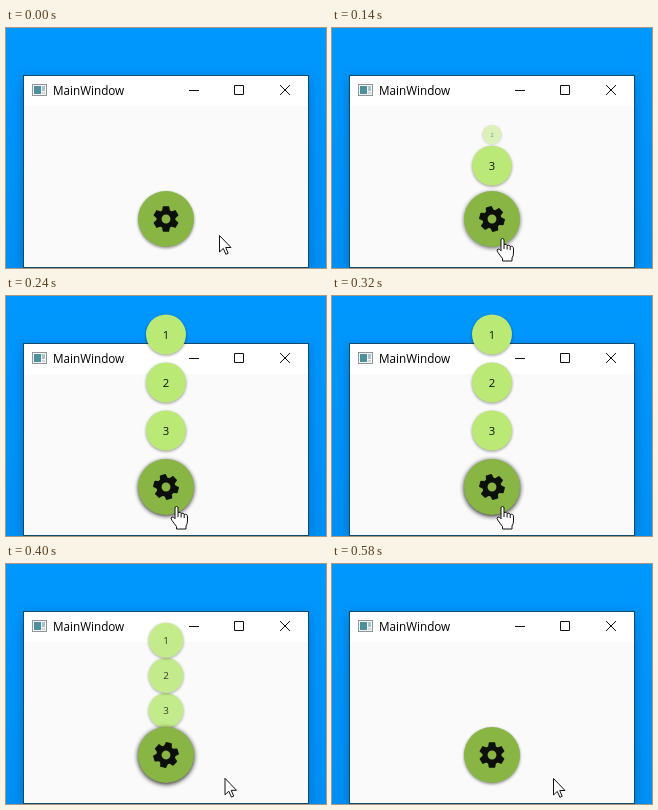
These frames come from a looping animation (320x240 px, 0.68 s). An HTML page:

```html
<!DOCTYPE html>
<html>
<head>
<meta charset="utf-8">
<title>Floating menu</title>
<style>
html, body { margin: 0; width: 100%; height: 100%; overflow: hidden; }
svg { display: block; width: 320px; height: 240px; }
text { font-family: "Open Sans", "Noto Sans", sans-serif; }
</style>
</head>
<body>
<svg viewBox="0 0 320 240">
  <defs>
    <linearGradient id="sky" x1="0" y1="0" x2="0" y2="1">
      <stop offset="0" stop-color="#0098fe"/>
      <stop offset="1" stop-color="#0090f5"/>
    </linearGradient>
    <filter id="wide" x="-20%" y="-20%" width="140%" height="140%"><feGaussianBlur stdDeviation="6"/></filter>
    <filter id="soft" x="-30%" y="-30%" width="160%" height="160%"><feGaussianBlur id="blur" stdDeviation="1.8"/></filter>
    <filter id="small" x="-30%" y="-30%" width="160%" height="160%"><feGaussianBlur stdDeviation="1.8"/></filter>
  </defs>

  <rect width="320" height="240" fill="url(#sky)"/>
  <rect x="17" y="50" width="286" height="192" fill="#003a70" opacity=".4" filter="url(#wide)"/>
  <rect x="17" y="47" width="286" height="193" fill="#10486f"/>
  <rect x="18" y="48" width="284" height="30" fill="#fff"/>
  <rect x="18" y="78" width="284" height="161" fill="#fafafa"/>

  <g>
    <rect x="26.5" y="56.5" width="14" height="11" fill="#f4f4f4" stroke="#8f9699"/>
    <rect x="28" y="58" width="7" height="8" fill="#4d8f9c"/>
    <rect x="36" y="58" width="3" height="5" fill="#a9c4cc"/>
    <rect x="36" y="64" width="3" height="2" fill="#cfd6d8"/>
  </g>
  <text x="47" y="67" font-size="11.7" fill="#000">MainWindow</text>
  <path d="M183 62.5h10M228.5 57.5h9v9h-9zM274 57l10 10M284 57l-10 10" fill="none" stroke="#111"/>

  <g id="items"></g>

  <circle id="shade" cx="160" r="28" filter="url(#soft)"/>
  <circle cx="160" cy="191" r="28" fill="#88b544"/>
  <g id="gear" fill="#0d0f0b">
    <circle r="5.5" fill="none" stroke="#0d0f0b" stroke-width="4"/>
  </g>

  <path id="arrow" d="M.5 .5V17L4.3 13.4L6.9 19.3L9.2 18.3L6.7 12.5H12Z" fill="#fff" stroke="#111"/>
  <path id="hand" d="M-1 2Q-1 .5 .5 .5T2 2V6.5Q4.5 5.5 5.1 7.4Q7.5 6.3 8.2 8.4Q11.5 7.5 11.5 11V15Q11.5 18 10 20V23H.5V20.5Q-1.5 18 -4 14.5Q-6 11.5 -4 11Q-2.5 10.5 -1 12.8ZM2 6.5V11M5.1 7.4V11.5M8.2 8.4V12" fill="#fff" stroke="#111"/>
</svg>
<script>
const NS = "http://www.w3.org/2000/svg";
const LOOP = 680, STEP = 20, LAST = 580;
const el = id => document.getElementById(id);

function set(node, attrs) {
  for (const k in attrs) node.setAttribute(k, attrs[k]);
}
function add(parent, tag, attrs = {}) {
  const node = document.createElementNS(NS, tag);
  set(node, attrs);
  return parent.appendChild(node);
}

// Progress from 0 to 1 between times a and b: plain, and slowing to a stop
const ramp = (t, a, b) => Math.min(1, Math.max(0, (t - a) / (b - a)));
const ease = (t, a, b) => Math.sin(ramp(t, a, b) * Math.PI / 2);

for (let i = 0; i < 6; i++) {
  add(el("gear"), "path", {
    d: "M-3.1-6.6L-2.5-9.6Q-2.4-10-2-10H2Q2.4-10 2.5-9.6L3.1-6.6Z",
    transform: `rotate(${i * 60})`
  });
}

// Bottom item first
const items = ["3", "2", "1"].map(label => {
  const g = add(el("items"), "g");
  add(g, "circle", { cy: 1, r: 20, fill: "#000", opacity: .4, filter: "url(#small)" });
  add(g, "circle", { r: 20, fill: "#bae976" });
  const text = add(g, "text", { y: 4, "font-size": 11.3, "text-anchor": "middle", fill: "#111" });
  text.textContent = label;
  return g;
});

function place(g, y, scale, opacity) {
  set(g, {
    transform: `translate(160 ${y}) scale(${scale})`,
    opacity,
    visibility: opacity > 0 ? "visible" : "hidden"
  });
}

// Each item opens a 48 px slot on top of the one below
function unfold(t) {
  let base = 158.5;
  items.forEach((g, i) => {
    const start = 108 + i * 20;
    const p = 1 - (1 - ramp(t, start, start + 50)) ** 2;
    const size = Math.min(1, p * 1.14);
    place(g, base - 24 * p, size, size);
    base -= 48 * p;
  });
}

// The whole stack shrinks and sinks behind the button
function fold(t) {
  const f = ramp(t, 360, 460), q = f * f;
  const y = 134.5 + 16 * f + 36 * q;
  const gap = Math.max(0, 48 - 80 * q);
  items.forEach((g, i) => place(g, y - i * gap, 1 - .8 * q, 1 - q));
}

function draw(t) {
  if (t > 360) fold(t);
  else unfold(t);

  const lift = ramp(t, 60, 300) - ramp(t, 420, 580);
  set(el("shade"), { cy: 192.2, opacity: .45 + lift * .45 });
  set(el("blur"), { stdDeviation: 1.8 + lift * .7 });

  const angle = 45 * (ease(t, 40, 100) - ease(t, 360, 440));
  set(el("gear"), { transform: `translate(160 191) rotate(${angle}) scale(1.27)` });

  const enter = ease(t, 10, 115), leave = ease(t, 340, 415);
  const x = 213 - 43 * enter + 51 * leave;
  const y = 207 + 3 * enter + 4 * leave;
  const over = Math.hypot(x - 160, y - 191) < 30;
  const transform = `translate(${x} ${y})`;
  set(el("hand"), { transform, visibility: over ? "visible" : "hidden" });
  set(el("arrow"), { transform, visibility: over ? "hidden" : "visible" });
}

let start;
function tick(now) {
  start ??= now;
  const t = (now - start) % LOOP;
  draw(Math.min(LAST, Math.floor(t / STEP) * STEP));
  requestAnimationFrame(tick);
}
draw(0);
requestAnimationFrame(tick);
</script>
</body>
</html>
```
